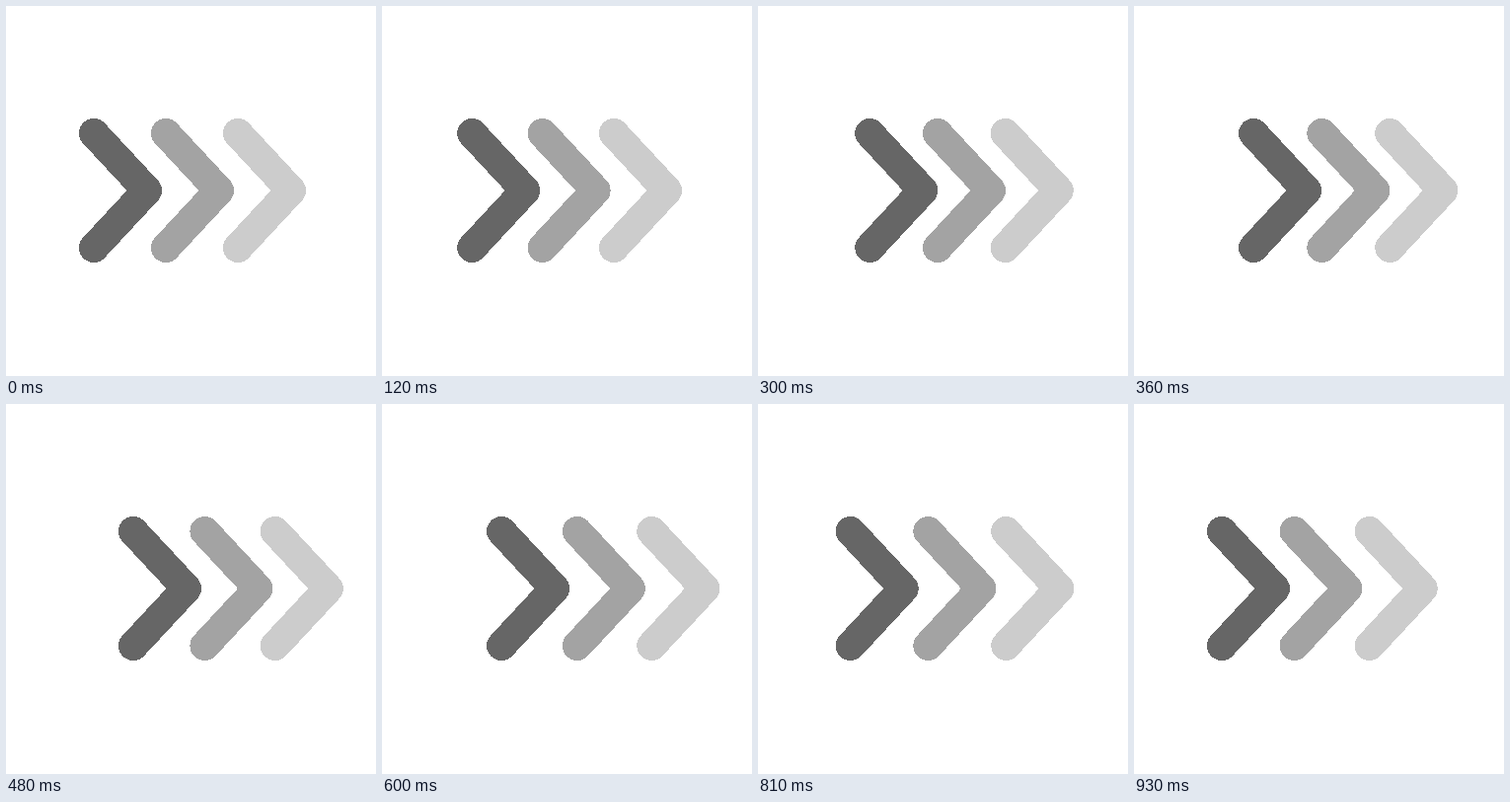
An HTML page that plays this animation: 375x375 px, repeating every 0.96 s.

```html
<!DOCTYPE html>
<html lang="en">
<head>
<meta charset="utf-8">
<title>Sliding chevrons</title>
<style>
  html, body { margin: 0; width: 100%; height: 100%; overflow: hidden; background: #fff; }
  svg { display: block; width: 100vw; height: 100vh; }
  path { fill: none; stroke-width: 30; stroke-linecap: round; stroke-linejoin: round; }
</style>
</head>
<body>
<svg viewBox="0 0 375 375" shape-rendering="crispEdges"></svg>
<script>
  const LOOP = 960, STEP = 30, TRAVEL = 40;
  const svg = document.querySelector('svg');

  // Each chevron slides right from start to peak, then back until end (ms).
  const chevrons = [
    { x: 89, color: '#666666', start: 60, peak: 480, end: 900 },
    { x: 162, color: '#a3a3a3', start: 90, peak: 510, end: 960 },
    { x: 235, color: '#cccccc', start: 120, peak: 540, end: 1020 }
  ];

  for (const c of chevrons) {
    c.el = document.createElementNS('http://www.w3.org/2000/svg', 'path');
    c.el.setAttribute('d', 'M0 129L54 187L0 245');
    c.el.setAttribute('stroke', c.color);
    svg.append(c.el);
  }

  function ease(from, to, t) {
    const u = Math.min(1, Math.max(0, (t - from) / (to - from)));
    return u * u * (3 - 2 * u);
  }

  function draw(ms) {
    const t = Math.floor((ms % LOOP) / STEP) * STEP;
    for (const c of chevrons) {
      const shift = TRAVEL * (ease(c.start, c.peak, t) - ease(c.peak, c.end, t));
      c.el.setAttribute('transform', `translate(${c.x + shift} 0)`);
    }
  }

  const origin = performance.now();
  function tick() {
    draw(performance.now() - origin);
    requestAnimationFrame(tick);
  }
  tick();
</script>
</body>
</html>
```
